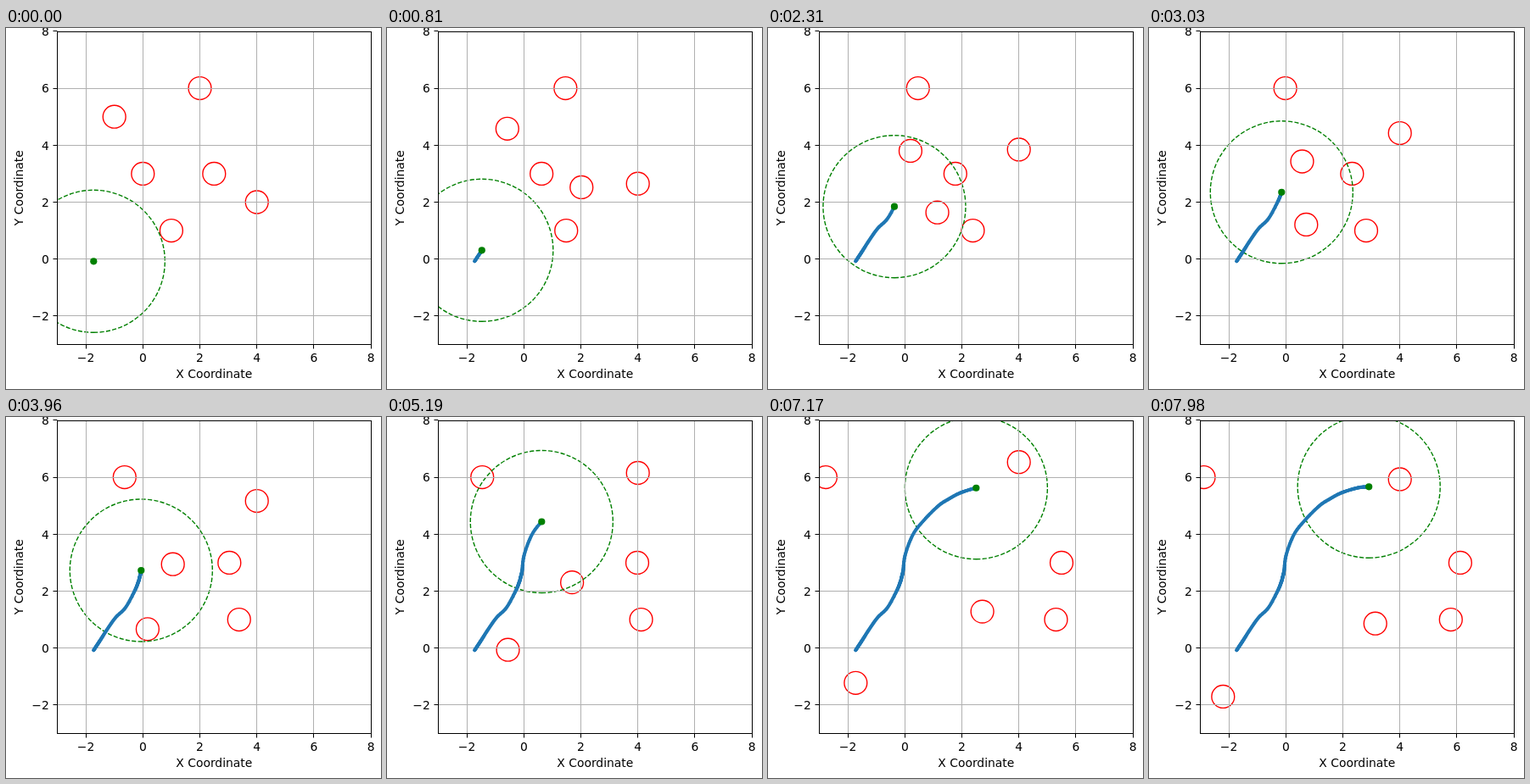
An HTML page with a canvas for the animation above (8 s loop, 442x426 px).

```html
<!DOCTYPE html>
<html lang="en">
<head>
<meta charset="utf-8">
<title>Moving obstacles</title>
<style>
  html, body { margin: 0; width: 100%; height: 100%; overflow: hidden; background: #fff; }
  canvas { display: block; }
</style>
</head>
<body>
<canvas id="plot" width="442" height="426"></canvas>
<script>
const ctx = document.getElementById('plot').getContext('2d');
const LOOP = 8000, STEP = 30, LAST = 266;
const UNIT = 33.6, LINE = 1.39;
const BOX = { left: 60.5, top: 4.5, right: 430.5, bottom: 373.5 };
const TICKS = [-2, 0, 2, 4, 6, 8];

const px = x => 60.5 + (x + 3) * UNIT;
const py = y => 272.7 - y * UNIT;
const snap = v => Math.floor(v) + 0.5;

// start x, start y, velocity per step
const DIAG = Math.SQRT1_2;
const obstacles = [
  { x: -1, y: 5, vx: 0.022 * DIAG, vy: -0.022 * DIAG },
  { x: 2, y: 6, vx: -0.02, vy: 0, turn: 255, back: 1 },
  { x: 0, y: 3, vx: 0.023, vy: 0 },
  { x: 2.5, y: 3, vx: -0.025 * DIAG, vy: -0.025 * DIAG },
  { x: 4, y: 2, vx: 0, vy: 0.024, turn: 213, back: 0.93 },
  { x: 1, y: 1, vx: 0.018, vy: 0 }
];

// robot waypoints in pixels: step, x, y
const way = [
  [0, 103.3, 275.3], [27, 111.8, 262.3], [40, 119, 251], [54, 129.1, 236.8],
  [67, 140.8, 225], [81, 151.3, 206], [101, 156.3, 193.8], [108, 157.2, 190.5],
  [132, 159.3, 181], [148, 161.9, 162], [162, 171, 138.5], [173, 182.3, 123.5],
  [189, 201, 104.7], [201, 213, 96.8], [214, 226.3, 89.7], [240, 246, 83.6],
  [266, 259.2, 82.3]
];

function slope(i, axis) {
  const a = way[Math.max(i - 1, 0)], b = way[Math.min(i + 1, way.length - 1)];
  return (b[axis] - a[axis]) / (b[0] - a[0]);
}

function robotAt(n) {
  let i = 0;
  while (i < way.length - 2 && n >= way[i + 1][0]) i++;
  const a = way[i], b = way[i + 1], span = b[0] - a[0], u = (n - a[0]) / span;
  const hermite = axis => {
    const v = 1 - u;
    return v * v * (1 + 2 * u) * a[axis] + u * u * (3 - 2 * u) * b[axis]
      + span * u * v * (v * slope(i, axis) - u * slope(i + 1, axis));
  };
  return [hermite(1), hermite(2)];
}

const trail = Array.from({ length: LAST + 1 }, (_, n) => robotAt(n));

function line(x1, y1, x2, y2) {
  ctx.beginPath();
  ctx.moveTo(x1, y1);
  ctx.lineTo(x2, y2);
  ctx.stroke();
}

function ring(x, y, r, color, dash = []) {
  ctx.strokeStyle = color;
  ctx.lineWidth = LINE;
  ctx.setLineDash(dash);
  ctx.beginPath();
  ctx.arc(x, y, r, Math.PI / 2, -Math.PI * 1.5, true);
  ctx.stroke();
  ctx.setLineDash([]);
}

function dot(x, y, r, color) {
  ctx.fillStyle = color;
  ctx.beginPath();
  ctx.arc(x, y, r, 0, Math.PI * 2);
  ctx.fill();
}

function drawObstacle(o, n) {
  const turn = o.turn ?? Infinity;
  const moved = n <= turn ? n : turn - (n - turn) * o.back;
  ring(px(o.x + o.vx * moved), py(o.y + o.vy * moved), 0.4 * UNIT, '#f00');
}

function drawGrid() {
  ctx.strokeStyle = '#b0b0b0';
  ctx.lineWidth = 1;
  for (const t of TICKS) {
    const x = snap(px(t)), y = snap(py(t));
    line(x, BOX.top, x, BOX.bottom);
    line(BOX.left, y, BOX.right, y);
  }
}

function drawAxes() {
  ctx.strokeStyle = ctx.fillStyle = '#000';
  ctx.lineWidth = 1;
  ctx.strokeRect(BOX.left, BOX.top, BOX.right - BOX.left, BOX.bottom - BOX.top);
  ctx.font = '13.89px "DejaVu Sans", sans-serif';
  for (const t of TICKS) {
    const x = snap(px(t)), y = snap(py(t));
    const label = String(t).replace('-', '\u2212');
    line(x, BOX.bottom, x, BOX.bottom + 5);
    line(BOX.left - 5, y, BOX.left, y);
    ctx.textAlign = 'center';
    ctx.fillText(label, px(t), 394);
    ctx.textAlign = 'right';
    ctx.fillText(label, 50.8, py(t) + 5.2);
  }
  ctx.textAlign = 'center';
  ctx.fillText('X Coordinate', 245.3, 413);
  ctx.save();
  ctx.translate(20, 188.7);
  ctx.rotate(-Math.PI / 2);
  ctx.fillText('Y Coordinate', 0, 0);
  ctx.restore();
}

function draw(n) {
  const [x, y] = trail[n];
  ctx.fillStyle = '#fff';
  ctx.fillRect(0, 0, 442, 426);
  ctx.save();
  ctx.beginPath();
  ctx.rect(BOX.left, BOX.top, BOX.right - BOX.left, BOX.bottom - BOX.top);
  ctx.clip();
  for (const o of obstacles) drawObstacle(o, n);
  ring(x, y, 2.5 * UNIT, '#008000', [3.7 * LINE, 1.6 * LINE]);
  drawGrid();
  for (let i = 0; i <= n; i++) dot(...trail[i], 2.1, '#1f77b4');
  dot(x, y, 4.1, '#008000');
  ctx.restore();
  drawAxes();
}

const start = performance.now();
function tick() {
  const t = (performance.now() - start) % LOOP;
  draw(Math.min(LAST, Math.floor(t / STEP)));
  requestAnimationFrame(tick);
}
tick();
</script>
</body>
</html>
```
